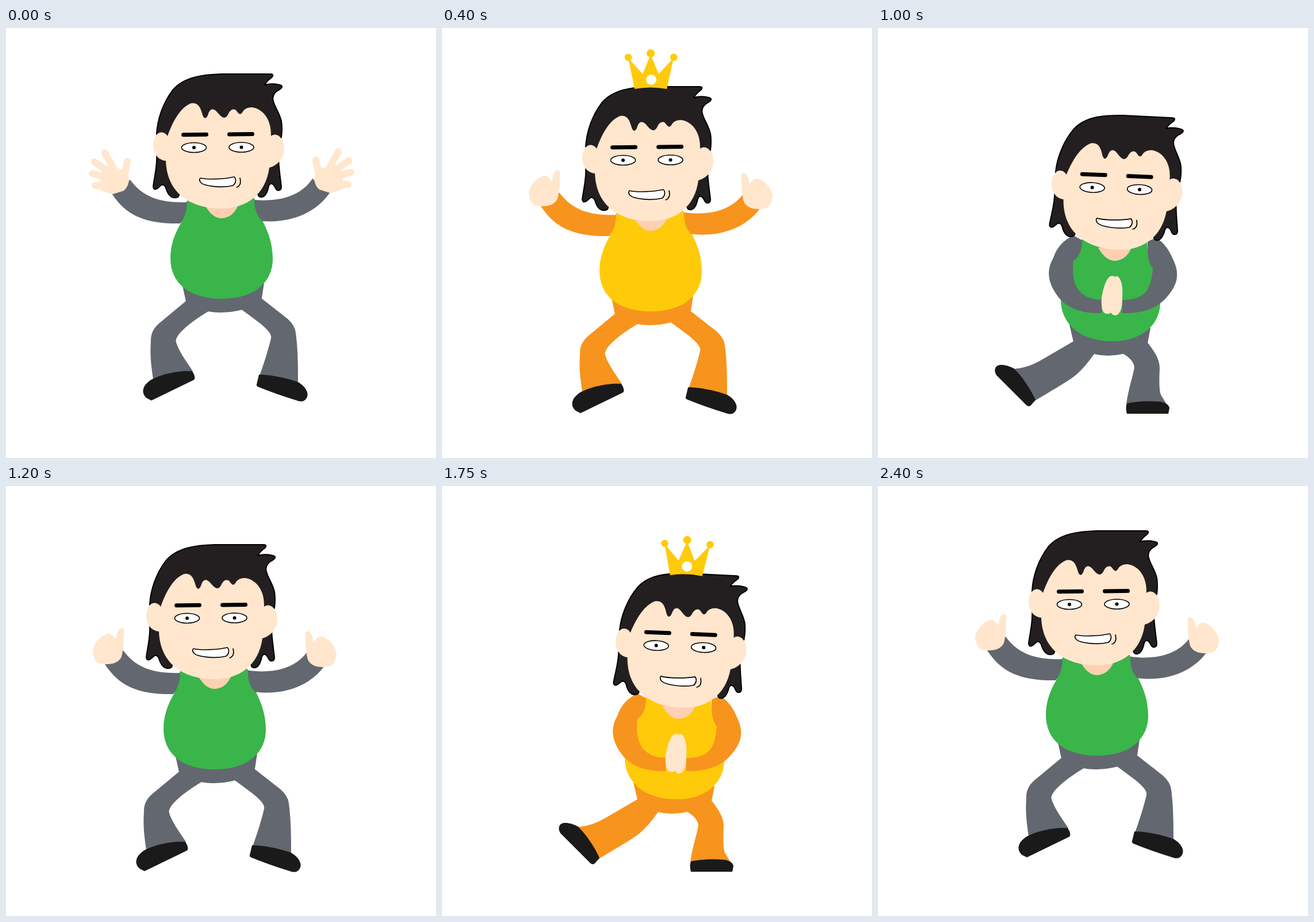
Write an HTML page with a canvas that moves like this. It is 748x748 px and loops after 2.45 s.

```html
<!DOCTYPE html>
<html lang="en">
<head>
<meta charset="utf-8">
<title>Dancing man</title>
<style>
html, body { margin: 0; width: 100%; height: 100%; overflow: hidden; background: #fff; }
canvas { display: block; width: 748px; height: 748px; }
</style>
</head>
<body>
<canvas id="stage" width="748" height="748"></canvas>
<script>
const ctx = document.getElementById('stage').getContext('2d');
const STEP = 50, STEPS = 49;
const SKIN = '#ffe6cd', NECK = '#fcd0b1', SHOE = '#1a1a1a', HAIR = '#231f20', GOLD = '#ffca0a';
const outfits = [
  { top: '#39b54a', limbs: '#636770' },
  { top: GOLD, limbs: '#f7941d', crown: true },
  { top: '#fff', limbs: '#ed1c24', dots: true }
];

const head = {
  locks: 'M262 215C264 240 258 258 256 276C257 284 263 280 268 275C273 270 277 274 279 281C282 290 288 297 296 295Q301 294 301 290L300 230Z M474 230C475 245 477 260 479 276C479 284 472 284 469 279C465 270 460 268 457 275C455 285 452 293 445 294Q439 295 438 288L440 240Z',
  hair: 'M262 185C263 160 273 130 290 108C310 84 345 81 375 80L460 80C466 80 465 84 461 87Q454 92 450 99C458 96 472 97 479 100C483 103 476 107 471 110C465 115 462 121 466 130C468 138 476 148 479 162Q481 175 479 190L465 220L270 220Z',
  face: 'M281 188C290 163 303 138 322 131C334 129 338 138 341 148C344 160 349 159 352 149C355 140 361 139 367 146C374 154 380 161 386 151C389 144 394 139 400 143C404 148 407 153 411 147C414 141 420 138 428 138C448 141 462 160 461 188C468 181 484 188 484 210C484 228 470 240 458 243C452 288 420 314 375 314C320 314 280 287 278 231C266 230 256 220 256 203C258 177 275 178 281 188Z',
  mouth: 'M338 261C350 264 380 263 397 259C401 263 400 270 395 274C375 279 345 275 339 269Q335 264 338 261Z',
  dimple: 'M407 261C409 269 407 275 401 277',
  crown: 'M347 84L336 30L361 58L375 24L389 58L415 30L403 84Q375 79 347 84Z'
};

const neck = 'M346 308C356 326 366 331 376 331C388 330 398 323 404 308Z';
const openHand = {
  palm: 'M178 238L200 246L205 242L214 262Q214 275 205 283L186 289Q170 286 160 279L165 264L167 250Z',
  fingers: [[190, 250, 172, 217], [185, 255, 154, 233], [180, 262, 150, 253], [185, 272, 155, 274], [205, 262, 211, 232]]
};
const thumbUp = 'M173 286C187 290 207 289 213 275C215 268 217 253 217 243C216 236 219 230 216 226C210 224 205 230 204 241L202 244C197 236 192 233 186 236C174 241 164 254 163 265Q165 282 173 286Z';

const jump = {
  torso: 'M315 300L304 340C292 360 286 380 286 400C286 445 320 471 375 471C435 471 464 440 464 402C464 375 456 355 447 337L432 296Z',
  leftArm: 'M216 264C235 290 262 305 315 303Q315 325 303 340C245 341 210 328 184 288Z',
  rightArm: 'M432 299C480 303 515 290 533 262L565 284C545 315 505 340 446 336Q432 323 432 299Z',
  pelvis: 'M307 448L313 476L351 493Q380 498 411 490L445 470L449 443Z',
  legs: 'M313 475L266 514Q251 527 252 545C250 570 253 590 256 611L325 597C310 575 300 560 296 547C292 535 320 512 352 493Z M444 470L490 506Q503 518 504 530C508 560 508 590 508 620L441 605C450 580 456 560 461 540C464 528 440 512 410 490Z',
  shoes: 'M253 648L327 612Q331 608 324 597C300 595 270 603 256 610C240 618 232 633 245 644Z M436 620L440 603C460 603 490 609 508 616C524 625 530 640 519 648Q514 651 506 648Q470 637 438 624Q435 622 436 620Z',
  dots: [382, 393], neck: [0, 0], head: [0, 0, 0], bodyY: 0, armIn: 0, armTurn: [0, 0]
};
const tilted = {
  ...jump,
  pelvis: 'M302 447L309 475L345 493Q370 497 396 493L439 474L445 447Z',
  legs: 'M309 476L256 530Q251 535 251 550C249 575 251 605 251 632L318 615C306 590 299 565 296 550C293 540 320 512 346 494Z M438 476L496 519Q507 527 508 545L517 607L446 602C458 575 464 555 465 547C465 537 430 514 395 495Z',
  shoes: 'M250 664L322 633Q326 630 318 614C296 615 268 622 253 632C235 641 230 658 243 663Z M524 637L447 619Q441 617 446 602C476 598 506 600 518 606C537 614 541 635 524 637Z',
  dots: [382, 391], bodyY: 2, armIn: 3, armTurn: [-0.05, -0.04]
};
const kickRight = {
  torso: 'M275 355C276 380 273 395 264 409C256 425 253 440 253 455C252 500 285 531 338 531C395 530 427 495 427 450C424 425 418 405 406 388L389 355Z',
  leftArm: 'M275 353C215 350 200 400 201 433C203 470 235 492 272 497L274 467C250 460 238 448 237 432C238 418 250 410 264 409C273 395 276 375 275 353Z',
  rightArm: 'M405 344C445 348 480 385 481 410C480 445 450 470 422 478L416 448C432 440 436 425 435 415C430 398 418 388 405 388Q391 375 390 352Z',
  pelvis: 'M269 508L275 534L318 552Q345 559 374 552L406 529L412 497Z',
  legs: 'M275 532C265 555 258 575 258 590C256 615 256 632 253 640L243 657L313 655C314 630 305 600 301 585Q303 571 318 551Z M405 527L470 565Q490 577 513 577L474 634C440 615 410 598 400 585Q388 573 372 551Z',
  shoes: 'M240 671L238 661Q240 652 255 650C275 648 300 650 312 653Q315 660 312 671Z M473 632C482 612 497 590 511 577C525 570 540 568 543 577Q545 582 541 589L489 641Q484 646 479 639Z',
  hands: [
    { palm: 'M281 465L302 461L314 471L315 486L312 503Q298 517 273 501L270 484Z',
      fingers: [[286, 475, 291, 446], [300, 470, 335, 453], [300, 478, 344, 476], [300, 490, 337, 493], [300, 500, 322, 508]] },
    { palm: 'M398 450L412 447L422 458L424 478L408 494L384 500L381 485L380 472L386 458Z',
      fingers: [[402, 462, 399, 433], [395, 462, 357, 446], [390, 470, 350, 467], [390, 482, 360, 487], [395, 492, 373, 498]] }
  ],
  dots: [326, 434], neck: [-43, 60], head: [-38, 58, -0.07], locksBehind: true
};
const kickLeft = {
  torso: 'M355 368L340 405C325 430 318 455 318 478C322 522 360 545 408 545C460 545 492 515 491 475C488 450 483 430 478 418Q468 400 468 370Z',
  leftArm: 'M340 361C320 370 310 385 305 400C290 425 298 450 318 473C335 490 360 497 389 496L390 473C375 472 360 470 348 455C338 440 338 420 340 405Q355 395 355 369Z',
  rightArm: 'M484 365C500 375 508 390 513 402C527 430 520 450 498 473C480 490 455 497 425 496L425 473C445 473 462 468 470 453Q477 438 478 418Q467 405 469 371Z',
  pelvis: 'M333 516L340 546L375 567Q400 573 426 567L469 548L474 522Z',
  legs: 'M340 545L285 577Q258 593 232 593L272 649C300 632 335 612 345 603Q360 590 376 567Z M468 546C480 562 490 575 490 592C489 612 489 630 492 638L503 656L432 654C436 625 444 605 446 590Q444 576 425 566Z',
  shoes: 'M505 671L507 661Q505 652 490 650C470 648 445 650 433 653Q430 660 433 671Z M274 647C265 627 250 605 236 592C222 585 207 583 204 592Q202 597 206 604L258 656Q263 661 268 654Z',
  hands: [{ palm: 'M398 497C390 497 388 485 389 470C392 450 398 432 407 431Q411 431 411.5 433Q414 431 417 432C425 438 426 455 425 470C425 490 420 500 412 500Q407 499 405 495Q402 498 398 497Z', fingers: [] }],
  dots: [418, 470], neck: [37, 74], head: [46, 71.6, 0.05]
};

// Body offsets on each beat and just after it
const hits = [[0, 0], [-12, 22], [6, -2], [-12, 22], [3, -5], [-12, 4], [6, -2]];
const leaves = [[9, 6], [-2, 8], [-2, -2], [-6, 0], [-6, 10], [-6, -2]];
const kickX = [0, -16, 0, 0, 0, -8];

const paths = new Map();
function shape(d) {
  if (!paths.has(d)) paths.set(d, new Path2D(d));
  return paths.get(d);
}
function fill(d, color) {
  ctx.fillStyle = color;
  ctx.fill(shape(d));
}
function outline(d, width) {
  ctx.strokeStyle = '#000';
  ctx.lineWidth = width;
  ctx.stroke(shape(d));
}
function line(x1, y1, x2, y2, width, color) {
  ctx.strokeStyle = color;
  ctx.lineWidth = width;
  ctx.beginPath();
  ctx.moveTo(x1, y1);
  ctx.lineTo(x2, y2);
  ctx.stroke();
}
function oval(x, y, rx, ry, color) {
  ctx.fillStyle = color;
  ctx.beginPath();
  ctx.ellipse(x, y, rx, ry, 0, 0, 7);
  ctx.fill();
}
function group(draw) {
  ctx.save();
  draw();
  ctx.restore();
}
function turn(x, y, angle) {
  ctx.translate(x, y);
  ctx.rotate(angle);
  ctx.translate(-x, -y);
}

function drawHand(hand) {
  fill(hand.palm, SKIN);
  for (const f of hand.fingers) line(...f, 12, SKIN);
}

function placeHead([x, y, angle]) {
  ctx.translate(x, y);
  turn(370, 200, angle);
}

function drawHair(d) {
  fill(d, HAIR);
  outline(d, 2);
}

function drawLocks(pose) {
  group(() => {
    placeHead(pose.head);
    drawHair(head.locks);
  });
}

function drawHead(pose, outfit) {
  placeHead(pose.head);
  drawHair(head.hair);
  fill(head.face, SKIN);
  line(308.5, 185.7, 348.5, 185.3, 7, '#000');
  line(388.5, 185, 428.5, 184.6, 7, '#000');
  for (const [ex, ey] of [[327, 208], [409.5, 207.5]]) {
    oval(ex, ey, 21.5, 8.5, '#fff');
    ctx.strokeStyle = '#000';
    ctx.lineWidth = 1.6;
    ctx.stroke();
    oval(ex, ey, 3, 3, '#000');
  }
  fill(head.mouth, '#fff');
  outline(head.mouth, 1.7);
  outline(head.dimple, 1.7);
  if (outfit.crown) {
    // The crown leans less than the head
    turn(375, 190, -0.4 * pose.head[2]);
    fill(head.crown, GOLD);
    oval(336, 29, 6.3, 6.3, GOLD);
    oval(375, 22, 7, 7, GOLD);
    oval(415, 29, 6.3, 6.3, GOLD);
    oval(376, 68, 9, 9, '#fff');
  }
}

function drawDots(pose) {
  ctx.clip(shape(pose.torso));
  const [x, y] = pose.dots;
  for (let row = -4; row <= 4; row++) {
    for (let col = -4; col <= 4; col++) {
      if ((row + col) % 2) continue;
      const r = row % 2 ? 8.5 : 10;
      oval(x + col * 36, y + row * 36, r, r, '#ed1c24');
    }
  }
}

function drawRaisedArm(pose, outfit, thumbs, right) {
  const pivot = [right ? 440 : 310, 320];
  ctx.translate(right ? -pose.armIn : pose.armIn, 0);
  turn(...pivot, pose.armTurn[right ? 1 : 0]);
  group(() => {
    if (thumbs && right) turn(...pivot, 0.05);
    fill(right ? pose.rightArm : pose.leftArm, outfit.limbs);
  });
  if (right) {
    ctx.translate(750, thumbs ? 5 : -2);
    ctx.scale(-1, 1);
  }
  if (thumbs) fill(thumbUp, SKIN);
  else drawHand(openHand);
}

function drawArms(pose, outfit, thumbs) {
  if (pose.hands) {
    fill(pose.leftArm, outfit.limbs);
    fill(pose.rightArm, outfit.limbs);
    return;
  }
  for (const right of [false, true]) {
    group(() => drawRaisedArm(pose, outfit, thumbs, right));
  }
}

function drawBody(pose, outfit, thumbs) {
  ctx.translate(0, pose.bodyY || 0);
  fill(pose.torso, outfit.top);
  if (outfit.dots) group(() => drawDots(pose));
  drawArms(pose, outfit, thumbs);
  ctx.translate(...pose.neck);
  fill(neck, NECK);
}

function drawMan(pose, outfit, thumbs) {
  fill(pose.pelvis, outfit.limbs);
  fill(pose.legs, outfit.limbs);
  fill(pose.shoes, SHOE);
  if (pose.locksBehind) drawLocks(pose);
  group(() => drawBody(pose, outfit, thumbs));
  if (!pose.locksBehind) drawLocks(pose);
  group(() => drawHead(pose, outfit));
  if (pose.hands) pose.hands.forEach(drawHand);
}

function poseAt(step) {
  const beat = Math.floor(step / 8), part = step % 8;
  if (part >= 3 && part <= 6) {
    return { pose: beat % 2 ? kickRight : kickLeft, x: kickX[beat], y: 0 };
  }
  if (part === 7) {
    const [x, y] = hits[beat + 1];
    return { pose: jump, x: x - 5, y, thumbs: true };
  }
  if (part === 0) {
    const [x, y] = hits[beat];
    return { pose: jump, x, y, thumbs: step > 0 };
  }
  const [x, y] = leaves[beat];
  return { pose: beat % 3 === 2 ? tilted : jump, x, y: y + (part - 1) * 12 };
}

function render(now) {
  const step = Math.floor(now / STEP) % STEPS;
  const { pose, x, y, thumbs } = poseAt(step);
  const outfit = outfits[Math.floor((step + 4) / 8) % 3];
  ctx.fillStyle = '#fff';
  ctx.fillRect(0, 0, 748, 748);
  ctx.lineCap = ctx.lineJoin = 'round';
  group(() => {
    ctx.translate(x, y);
    drawMan(pose, outfit, thumbs);
  });
}

let start;
function tick(now) {
  start ??= now;
  render(now - start);
  requestAnimationFrame(tick);
}
render(0);
requestAnimationFrame(tick);
</script>
</body>
</html>
```
